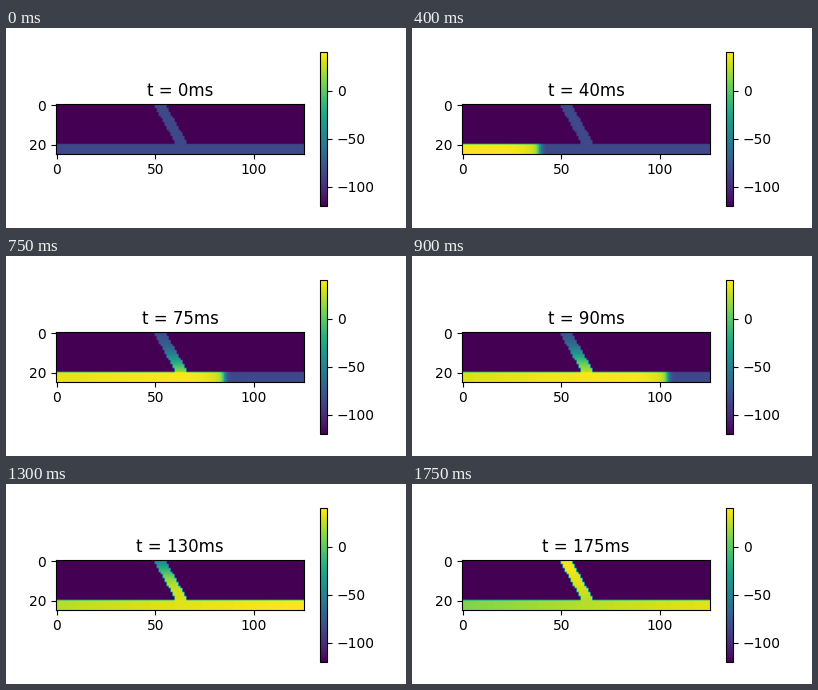
Animation, 400 px wide and 200 px high, one loop 1800 ms. Source, as a matplotlib script:

```python
import numpy as np
import matplotlib.pyplot as plt
from matplotlib.animation import FuncAnimation

ROWS, COLS = 25, 126
CABLE_TOP = 20
BRANCH_LEFT, BRANCH_WIDTH = 50, 6
BRANCH_SLOPE = np.tan(np.radians(30))
JUNCTION = 63
EMPTY, REST, PEAK = -120, -85, 40
STEP_MS, FRAMES = 5, 36


def sigmoid(x):
    return 1 / (1 + np.exp(-x))


def action_potential(tau):
    """Voltage tau ms after the front: upstroke, rounded peak, slow decay."""
    after = np.maximum(tau, 0)
    upstroke = 105 * sigmoid(tau / 0.6)
    crest = (PEAK - REST - 105) * (1 - np.exp(-after / 5))
    decay = 30 * (after / 160) ** 1.7
    return REST + upstroke + crest - decay


def cable_voltage(t, col):
    arrival = 12 + 0.7 * col + 0.0005 * col ** 2
    return action_potential(t - arrival)


def branch_voltage(t, height):
    """The front climbs the branch slowly, then the far end fires late."""
    late = 22 * sigmoid((t - 165) / 3) * height / CABLE_TOP
    top = cable_voltage(t, JUNCTION) + late
    climbed = 20 * (t / 140) ** 2
    return REST + (top - REST) * sigmoid((climbed - height) / 4)


def voltage(t):
    v = np.full((ROWS, COLS), float(EMPTY))
    v[CABLE_TOP:] = cable_voltage(t, np.arange(COLS))
    for row in range(CABLE_TOP):
        left = BRANCH_LEFT + int(row * BRANCH_SLOPE)
        v[row, left:left + BRANCH_WIDTH] = branch_voltage(t, CABLE_TOP - row)
    return v


fig, ax = plt.subplots(figsize=(4, 2), dpi=100)
image = ax.imshow(voltage(0), vmin=EMPTY, vmax=PEAK, cmap="viridis")
fig.colorbar(image, ax=ax)
title = ax.set_title("t = 0ms")


def update(frame):
    t = frame * STEP_MS
    image.set_data(voltage(t))
    title.set_text(f"t = {t}ms")
    return image, title


anim = FuncAnimation(fig, update, frames=FRAMES, interval=50,
                     repeat=True, repeat_delay=0)
plt.show()
```
